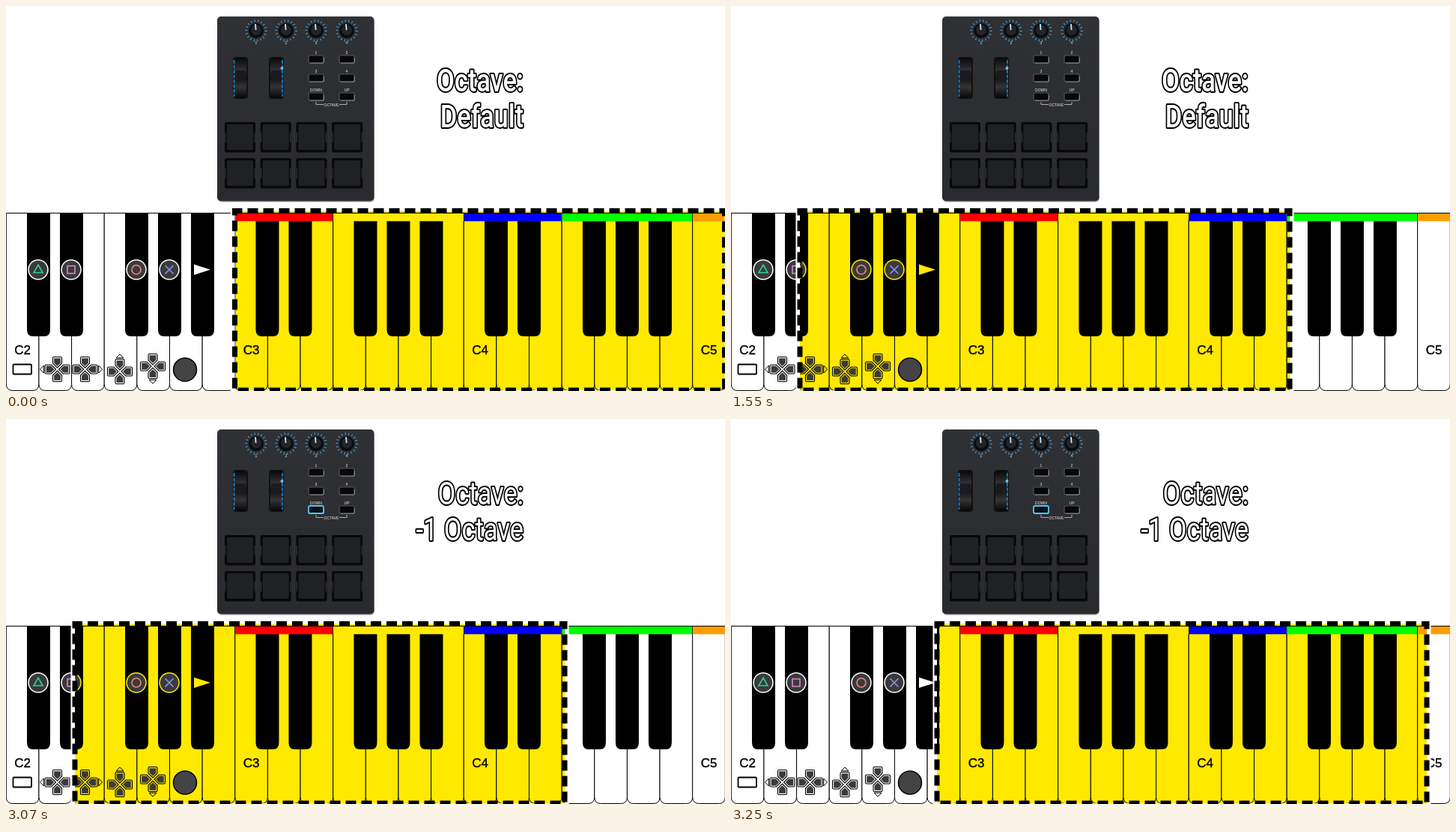
Recreate the animation shown at these times as an HTML page. Size 960 px wide and 514 px high, loop 3280 ms.

```html
<!DOCTYPE html>
<html lang="en">
<head>
<meta charset="utf-8">
<title>Octave shift</title>
<style>
  html, body { margin: 0; width: 100%; height: 100%; overflow: hidden; background: #fff; }
  svg { display: block; width: 100%; height: 100%; isolation: isolate; }
  .note { font: 17px "Liberation Sans", sans-serif; text-anchor: middle; stroke: #000; stroke-width: .4; }
  .tiny { font: 5px "Liberation Sans", sans-serif; text-anchor: middle; fill: #eee; }
  .title { font: 42px Roboto, sans-serif; text-anchor: end; fill: #fff; stroke: #000;
           stroke-width: 4; stroke-linejoin: round; paint-order: stroke; }
  #highlight { mix-blend-mode: multiply; }
</style>
</head>
<body>
<svg viewBox="0 0 960 514">
  <defs>
    <linearGradient id="body" x2="0" y2="1">
      <stop stop-color="#303135"/><stop offset="1" stop-color="#292a2d"/>
    </linearGradient>
    <linearGradient id="wheel" x2="0" y2="1">
      <stop stop-color="#090909"/><stop offset=".3" stop-color="#303032"/>
      <stop offset=".5" stop-color="#111"/><stop offset=".72" stop-color="#343436"/>
      <stop offset="1" stop-color="#060606"/>
    </linearGradient>
    <g id="dpad"></g>
  </defs>
  <g id="device"></g>
  <g id="keys"></g>
  <rect id="highlight" y="273.5" width="654" height="241" fill="#ffe900"/>
  <g id="marks"></g>
  <g id="frame" fill="none">
    <rect x=".75" y="270.75" width="659.5" height="245" stroke="#fff" stroke-width="5.5"/>
    <rect x="3.5" y="273.5" width="654" height="239.5" stroke="#000" stroke-width="7"
          stroke-dasharray="14 7" stroke-dashoffset="4"/>
  </g>
  <g transform="translate(691 0) scale(.82 1)">
    <text class="title" y="114.5">Octave:</text>
    <text class="title" id="setting" y="162.5">Default</text>
  </g>
</svg>
<script>
const $ = id => document.getElementById(id);
const range = n => [...Array(n).keys()];
const rect = (x, y, w, h, attrs = '') => `<rect x="${x}" y="${y}" width="${w}" height="${h}" ${attrs}/>`;
const circle = (x, y, r, attrs = '') => `<circle cx="${x}" cy="${y}" r="${r}" ${attrs}/>`;
const path = (d, attrs = '') => `<path d="${d}" ${attrs}/>`;
const text = (x, y, cls, s) => `<text class="${cls}" x="${x}" y="${y}">${s}</text>`;

const KEY = 960 / 22, OCTAVE = KEY * 7;

function drawDevice() {
  let out = rect(283, 16, 209, 246, 'rx="5" fill="#bbb"') + rect(282, 14, 209.5, 246.5, 'rx="5" fill="url(#body)"');

  [334, 374, 414, 455].forEach((x, i) => {
    out += circle(x, 33, 13.2, 'fill="none" stroke="#3b9bd8" stroke-width="3" stroke-dasharray="1.2 3.4" pathLength="83"')
      + circle(x, 33, 10, 'fill="#0c0c0d"') + circle(x, 32, 7, 'fill="#242528"')
      + path(`M${x - 1} 24l.6 8`, 'stroke="#c4e6ff" stroke-width="1.8"')
      + text(x, 51, 'tiny', i + 1);
  });

  [[313, 304.5], [361, 369]].forEach(([x, light]) => {
    out += rect(x - 10, 68, 20, 56, 'rx="4" fill="#101113"')
      + rect(x - 8, 69, 16, 54, 'rx="5" fill="url(#wheel)"')
      + rect(x - 7, 86, 14, 13, 'rx="3" fill="#1b1b1d"')
      + path(`M${light} 72V121`, 'stroke="#1686d0" stroke-width="1.6" stroke-dasharray="5 1.5"');
  });
  out += circle(368.5, 83, 2, 'fill="#62c4ff"');

  ['1', '2', '3', '4', 'DOWN', 'UP'].forEach((label, i) => {
    const x = i % 2 ? 455 : 414, y = 71 + 25 * (i >> 1);
    out += text(x, y - 7.5, 'tiny', label)
      + rect(x - 10, y - 5, 20, 10, 'rx="2" fill="#08080a" stroke="#55565a" stroke-width="1.2"')
      + path(`M${x - 8} ${y + 5.2}h17q1.5 0 1.5-2v-5`, 'fill="none" stroke="#aaa" stroke-width=".7"');
  });
  out += path('M414 128v3.5h10M445 131.5h10v-3.5', 'fill="none" stroke="#ccc" stroke-width=".8"')
    + text(434.5, 133.5, 'tiny', 'OCTAVE')
    + rect(404, 116, 20, 10, 'id="down" rx="2" fill="#07131b" stroke="#58c4f4" stroke-width="1.8"');

  range(8).forEach(i => {
    const x = 292 + 47.7 * (i % 4), y = 155 + 48 * (i >> 2);
    out += rect(x, y, 41, 40.5, 'rx="2" fill="#09090a"')
      + rect(x + 3, y + 3, 35, 34, 'rx="2" fill="#202124"')
      + path(`M${x + 1} ${y + 14}v13M${x + 40} ${y + 14}v13`, 'stroke="#48494c" stroke-width=".8"');
  });
  $('device').innerHTML = out;
}

// White areas here are tinted by the highlight's multiply blend.
function drawKeys() {
  let out = range(22).map(i => path(
    `M${i * KEY + .3} 276.5h${KEY}v228q0 9-9 9h${18 - KEY}q-9 0-9-9z`,
    'fill="#fff" stroke="#000"')).join('');
  range(3).forEach(octave => [28, 72, 159, 203, 247].forEach(offset => {
    const x = offset + octave * OCTAVE, top = octave ? 287 : 276;
    out += path(`M${x} ${top}h31V432q0 9-8 9h-15q-8 0-8-9z`);
  }));
  [43, 87, 174, 218].forEach(x => out += circle(x, 352, 13.7, 'fill="#fff"'));
  out += path('M251 345l22 7-22 7z', 'fill="#fff"');
  $('keys').innerHTML = out;
}

function drawMarks() {
  $('dpad').innerHTML = [0, 90, 180, 270].map(a => `<g transform="rotate(${a})">`
    + path('M-4.5-16.5h9q1.5 0 1.5 1.5v7L0-2l-6-6v-7q0-1.5 1.5-1.5z', 'fill="none" stroke="#000" stroke-width="1.1"')
    + path('M-4.4-14.8h8.8v6.3L0-4.2l-4.4-4.3z', 'fill="#3a3a3c"') + '</g>').join('');

  let out = '';
  [[7, 10, '#f00'], [10, 14, '#ffe900'], [14, 17, '#00f'], [17, 21, '#0f0'], [21, 22, '#ff9c00']]
    .forEach(([from, to, color]) =>
      out += rect(from * KEY + .8, 277, (to - from) * KEY - 1, 10.3, `fill="${color}"`));
  [0, 7, 14, 21].forEach((k, i) => out += text((k + .5) * KEY + .4, 465, 'note', 'C' + (i + 2)));

  [
    [43, '#2fd09b', 'M0-6.5L6 4H-6z'],
    [87, '#d58bc8', 'M-5-5H5V5H-5z'],
    [174, '#f08a7c', 'M-6 0a6 6 0 1 0 12 0a6 6 0 1 0-12 0'],
    [218, '#8c92f5', 'M-5.5-5.5L5.5 5.5M5.5-5.5L-5.5 5.5']
  ].forEach(([x, color, shape]) => {
    out += circle(x, 352, 12.2, 'fill="#3a3a3c"')
      + path(shape, `transform="translate(${x} 352)" fill="none" stroke="${color}" stroke-width="1.6"`);
  });

  out += rect(9.5, 478.5, 24.5, 13, 'rx="1" fill="none" stroke="#000" stroke-width="1.8"');
  [[68.5, 485, 270], [105.5, 485, 90], [152, 488, 0], [196, 481, 180]].forEach(([x, y, turn]) =>
    out += `<g transform="translate(${x} ${y})"><use href="#dpad"/>`
      + path('M-5-18.2h10L0-23z', `transform="rotate(${turn})" fill="none" stroke="#000"`) + '</g>');
  out += circle(239, 485.5, 15.5, 'fill="#444446" stroke="#000" stroke-width="1.5"');
  $('marks').innerHTML = out;
}

const LOOP = 3280, STEP = 30, LEAVE = 1370, BACK = 3010;
const RIGHT = 302, LEFT = -3;
const stepsSince = (t, start) => t < start ? 0 : Math.min(10, Math.floor((t - start) / STEP) + 1);

function render(now) {
  const t = now % LOOP;
  const shift = (stepsSince(t, LEAVE) - stepsSince(t, BACK)) / 10;
  const x = RIGHT + (LEFT - RIGHT) * shift;
  const lowered = t >= LEAVE + 9 * STEP;
  $('frame').setAttribute('transform', `translate(${x})`);
  $('highlight').setAttribute('x', x + 3.5);
  $('setting').textContent = lowered ? '-1 Octave' : 'Default';
  $('down').style.display = lowered ? '' : 'none';
  document.querySelectorAll('.title').forEach(el => el.style.fontWeight = lowered ? 400 : 500);
}

drawDevice();
drawKeys();
drawMarks();
const start = performance.now();
function tick() {
  render(performance.now() - start);
  requestAnimationFrame(tick);
}
tick();
</script>
</body>
</html>
```
